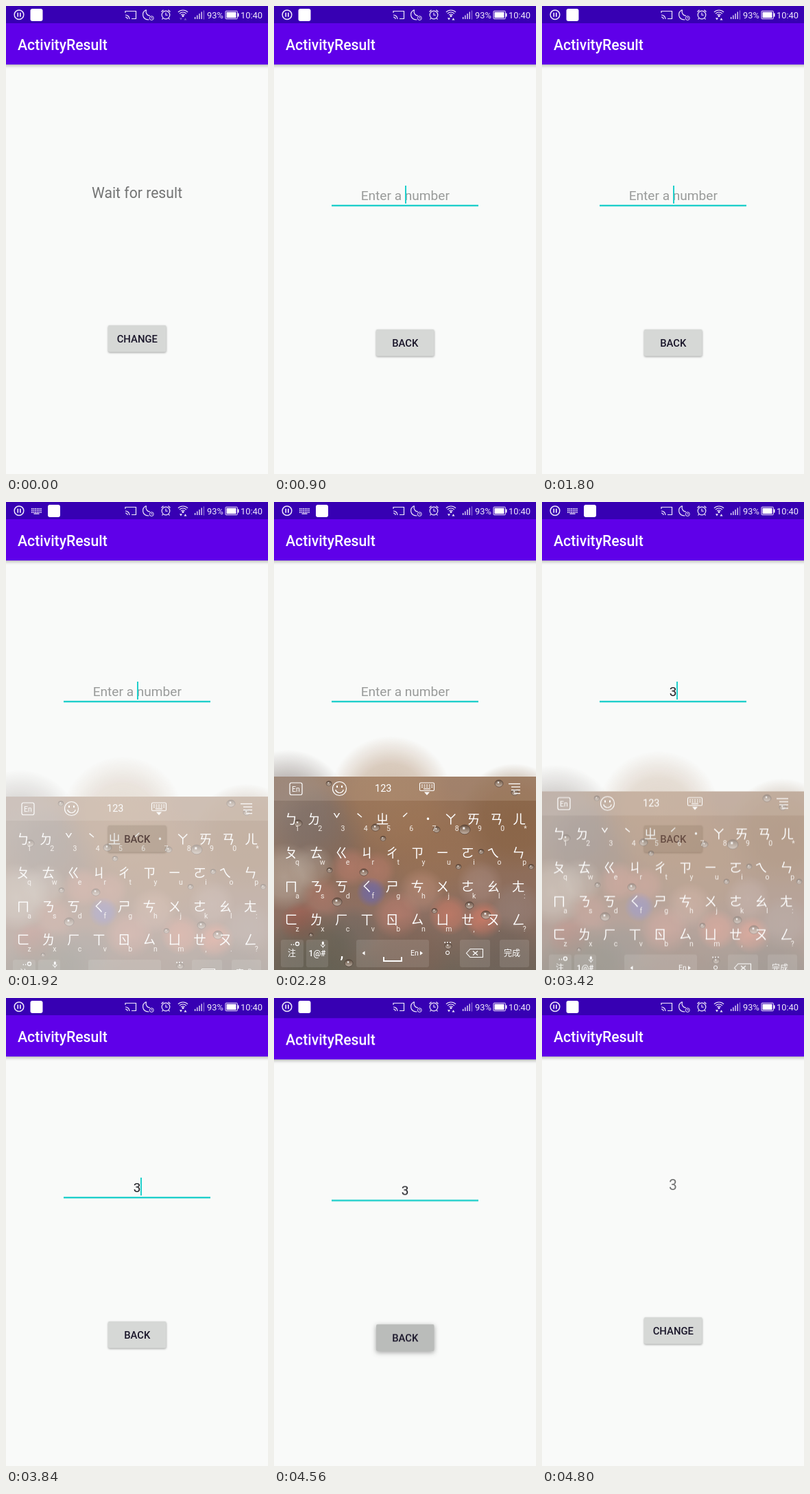
An HTML page with a canvas that plays this animation: 382x680 px, repeating every 6.42 s.

```html
<!DOCTYPE html>
<html lang="en">
<head>
<meta charset="utf-8">
<title>ActivityResult</title>
<style>
html, body { margin: 0; width: 100%; height: 100%; overflow: hidden; background: #f9faf9; }
canvas { display: block; width: 382px; height: 680px; }
</style>
</head>
<body>
<canvas id="stage"></canvas>
<script>
const W = 382, H = 680, LOOP = 6420, STEP = 60, KB_TOP = 399;
const UI = 'Roboto, sans-serif';
const CJK = '"Noto Sans CJK TC", "Noto Sans CJK", "Noto Sans CJK SC", "Noto Sans CJK JP", sans-serif';
const dpr = window.devicePixelRatio || 1;

function setup(cv) {
  cv.width = W * dpr;
  cv.height = H * dpr;
  const c = cv.getContext('2d');
  c.scale(dpr, dpr);
  return c;
}
const layer = () => setup(document.createElement('canvas'));

const clamp = v => Math.max(0, Math.min(1, v));
const ramp = (t, from, len) => clamp((t - from) / len);
const decel = p => 1 - (1 - p) * (1 - p);
const within = (t, a, b) => t >= a && t < b;

function text(c, s, x, y, font, color, align = 'center') {
  c.font = font;
  c.fillStyle = color;
  c.textAlign = align;
  c.fillText(s, x, y);
}
function box(c, x, y, w, h, r, color) {
  c.beginPath();
  c.roundRect(x, y, w, h, r);
  c.fillStyle = color;
  c.fill();
}
function frame(c, x, y, w, h, r, lw = 1) {
  c.lineWidth = lw;
  c.beginPath();
  c.roundRect(x, y, w, h, r);
  c.stroke();
}
function line(c, pts, lw = 1) {
  c.lineWidth = lw;
  c.beginPath();
  pts.forEach(([x, y], i) => i ? c.lineTo(x, y) : c.moveTo(x, y));
  c.stroke();
}
function arc(c, x, y, r, a = 0, b = Math.PI * 2, lw = 1) {
  c.lineWidth = lw;
  c.beginPath();
  c.arc(x, y, r, a, b);
  c.stroke();
}
function poly(c, pts) {
  c.beginPath();
  pts.forEach(([x, y]) => c.lineTo(x, y));
  c.fill();
}

// ---- status bar ----
function keyboardGlyph(c, x, y) {
  c.fillStyle = '#e6dcf7';
  for (let r = 0; r < 3; r++)
    for (let i = 0; i < 6; i++) c.fillRect(x + i * 2.6, y + r * 2.6, 1.7, 1.7);
  c.fillRect(x + 3.5, y + 7.4, 8, 1.4);
}
function statusIcons(c, typing, traffic) {
  const ink = '#f1ebfb', PI = Math.PI;
  c.strokeStyle = c.fillStyle = ink;
  arc(c, 19, 12.7, 6.8, 0, PI * 2, 1.5);
  c.fillRect(16.4, 9.7, 1.7, 6);
  c.fillRect(20, 9.7, 1.7, 6);
  if (typing) keyboardGlyph(c, 37, 9);
  box(c, typing ? 61 : 35.5, 4, 18, 18, 3, '#ffffff');

  c.strokeStyle = c.fillStyle = ink;
  line(c, [[174, 10], [174, 7.5], [189.5, 7.5], [189.5, 18.5], [183, 18.5]], 1.2);
  arc(c, 174, 19, 3, -PI / 2, 0, 1.2);
  arc(c, 174, 19, 6, -PI / 2, 0, 1.2);

  c.lineWidth = 1.2;
  c.beginPath();
  c.moveTo(204.5, 5.5);
  c.bezierCurveTo(197, 9, 198, 20, 208.5, 20);
  c.moveTo(204.5, 5.5);
  c.bezierCurveTo(203, 10, 206, 14.5, 210, 14);
  c.stroke();
  arc(c, 212.3, 17.6, 2.9);
  line(c, [[212.3, 16], [212.3, 17.8], [213.6, 17.8]], 0.9);

  arc(c, 233, 13, 5.8, 0, PI * 2, 1.2);
  line(c, [[233, 9.5], [233, 13.2], [235.8, 13.2]], 1.1);
  line(c, [[226.5, 8.5], [229.5, 5.8]], 1.3);
  line(c, [[239.5, 8.5], [236.5, 5.8]], 1.3);
  line(c, [[229, 17.5], [227.5, 19.5]], 1.2);
  line(c, [[237, 17.5], [238.5, 19.5]], 1.2);

  [10, 7, 4].forEach(r => arc(c, 258, 16, r, -PI * 0.75, -PI * 0.25, 1.2));
  c.beginPath();
  c.arc(258, 14.5, 1.5, 0, PI * 2);
  c.fill();
  c.fillStyle = traffic ? ink : 'rgba(241,235,251,.35)';
  poly(c, [[253, 17.2], [257, 17.2], [255, 20.4]]);
  poly(c, [[259.5, 20.4], [263.5, 20.4], [261.5, 17.2]]);

  c.fillStyle = ink;
  for (let i = 0; i < 4; i++) c.fillRect(275 + i * 3.2, 16 - i * 2.5, 1.3, 3 + i * 2.5);
  c.fillStyle = 'rgba(241,235,251,.55)';
  c.fillRect(288, 6.5, 1, 13);
  text(c, '93%', 305, 17.7, '12.85px ' + UI, ink);
  c.strokeStyle = ink;
  frame(c, 320, 7.3, 17.4, 11.4, 1);
  box(c, 321.5, 8.8, 14, 8.4, 0, '#ffffff');
  c.fillRect(338, 10.5, 1.5, 5);
  text(c, '10:40', 374, 17.7, '12.85px ' + UI, ink, 'right');
}

// ---- app screens ----
function appBase(c) {
  c.fillStyle = '#f9faf9';
  c.fillRect(0, 0, W, H);
  c.save();
  c.shadowColor = 'rgba(0,0,0,.32)';
  c.shadowBlur = 5 * dpr;
  c.shadowOffsetY = 1.5 * dpr;
  c.fillStyle = '#5f00e9';
  c.fillRect(-10, 25, W + 20, 60);
  c.restore();
  c.fillStyle = '#3700b3';
  c.fillRect(0, 0, W, 25);
  text(c, 'ActivityResult', 17, 63.5, '500 21.2px ' + UI, '#ffffff', 'left');
}
function button(c, label, y, press, fade) {
  c.save();
  c.shadowColor = 'rgba(0,0,0,.36)';
  c.shadowBlur = (3 + 4 * press * fade) * dpr;
  c.shadowOffsetY = (1 + press * fade) * dpr;
  box(c, 149, y, 84.5, 38.7, 2, '#d6d8d6');
  c.restore();
  if (press * fade > 0) {
    c.save();
    c.beginPath();
    c.roundRect(149, y, 84.5, 38.7, 2);
    c.clip();
    c.fillStyle = `rgba(0,0,0,${0.13 * fade})`;
    c.beginPath();
    c.arc(191, y + 19, 8 + 40 * press, 0, Math.PI * 2);
    c.fill();
    c.restore();
  }
  text(c, label, 191.3, y + 24.8, '500 14.85px ' + UI, '#191529');
}
function mainScreen(c, t) {
  appBase(c);
  text(c, t < 2000 ? 'Wait for result' : '3', 191, 279.3, '21.2px ' + UI, '#737474');
  button(c, 'CHANGE', 464, decel(ramp(t, 460, 200)), 1 - ramp(t, 680, 200));
}
function cursorOn(t) {
  return within(t, 840, 1380) || within(t, 1680, 2220) ||
         within(t, 2640, 3480) || within(t, 3840, 4380);
}
function inputScreen(c, t) {
  appBase(c);
  const typed = t >= 3000;
  if (typed) text(c, '3', 191, 281.8, '19.1px ' + UI, '#1e1e24');
  else text(c, 'Enter a number', 191.3, 281.8, '19.1px ' + UI, '#999b9a');
  c.fillStyle = '#1fcfcb';
  c.fillRect(84, 288.8, 214, 2.4);
  if (cursorOn(t)) c.fillRect(typed ? 196 : 191, 261, 2, 26);
  button(c, 'BACK', 470, decel(ramp(t, 4300, 180)), 1 - ramp(t, 4560, 160));
}

// ---- keyboard ----
function glow(c, x, y, r, rgb, a) {
  const g = c.createRadialGradient(x, y, 0, x, y, r);
  g.addColorStop(0, `rgba(${rgb},${a})`);
  g.addColorStop(0.55, `rgba(${rgb},${a * 0.75})`);
  g.addColorStop(1, `rgba(${rgb},0)`);
  c.fillStyle = g;
  c.fillRect(x - r, y - r, r * 2, r * 2);
}
function drop(c, x, y, r) {
  const g = c.createLinearGradient(x, y - r, x, y + r);
  g.addColorStop(0, 'rgba(80,62,50,.75)');
  g.addColorStop(0.5, 'rgba(150,132,118,.8)');
  g.addColorStop(1, 'rgba(216,204,194,.85)');
  c.beginPath();
  c.ellipse(x, y, r, r * 0.85, 0, 0, Math.PI * 2);
  c.fillStyle = g;
  c.fill();
  c.strokeStyle = 'rgba(45,33,28,.5)';
  c.lineWidth = 0.9;
  c.stroke();
  c.fillStyle = 'rgba(255,255,255,.85)';
  c.fillRect(x - r * 0.35, y - r * 0.45, r * 0.4, r * 0.4);
}
function backdrop(c) {
  const g = c.createLinearGradient(0, KB_TOP, 0, H);
  g.addColorStop(0, '#94725a');
  g.addColorStop(0.35, '#8f6c54');
  g.addColorStop(0.7, '#8d6f62');
  g.addColorStop(1, '#706458');
  c.fillStyle = g;
  c.fillRect(0, KB_TOP, W, H - KB_TOP);
  const gray = '139,128,123', tan = '166,126,92', pink = '196,128,112', pale = '190,178,166';
  [[20, 450, 90, gray, .7], [70, 480, 70, '120,106,100', .6], [170, 430, 90, tan, .5],
   [230, 500, 90, '157,116,84', .6], [350, 460, 80, '136,98,66', .7], [15, 545, 50, pale, .65],
   [55, 530, 34, pale, .4], [112, 530, 30, pink, .55], [150, 535, 28, pink, .5],
   [142, 567, 22, '108,104,176', .75], [70, 575, 30, pink, .4], [40, 612, 32, '176,84,70', .5],
   [180, 600, 36, pink, .6], [215, 565, 34, '200,150,132', .45], [255, 600, 30, '216,126,104', .6],
   [306, 608, 28, '222,126,104', .7], [300, 555, 34, '176,146,136', .5], [352, 590, 40, '150,130,122', .6],
   [115, 625, 40, '110,104,96', .6], [60, 660, 70, '92,94,80', .6], [200, 660, 60, '128,98,84', .5],
   [330, 660, 60, '110,98,90', .6]].forEach(a => glow(c, ...a));
  c.fillStyle = 'rgba(255,238,225,.13)';
  c.fillRect(0, KB_TOP, W, 35);
  [[80, 409, 4], [328, 409, 6], [351, 422, 5], [35, 467, 6], [148, 473, 6], [159, 489, 4],
   [237, 476, 5], [278, 476, 8], [302, 508, 4], [269, 530, 4], [131, 538, 6], [81, 535, 4],
   [375, 530, 4], [92, 581, 7], [234, 594, 4], [285, 586, 6], [309, 600, 7], [54, 629, 3],
   [254, 645, 5], [109, 670, 6]].forEach(d => drop(c, ...d));
}
function keyRow(c, keys, subs, y, gap) {
  [...keys].forEach((k, i) => {
    const x = 25 + i * gap;
    text(c, k, x, y + 7, '19px ' + CJK, '#ffffff');
    text(c, subs[i], x + 9, y + 17, '10.5px ' + UI, '#f3ece6');
  });
}
function toolRow(c) {
  c.strokeStyle = '#ffffff';
  frame(c, 23, 408, 18, 17.5, 2.5, 1.2);
  text(c, 'En', 32, 420.5, '10.5px ' + UI, '#ffffff');
  arc(c, 95.5, 416.5, 10, 0, Math.PI * 2, 1.2);
  arc(c, 95.5, 416.5, 6, 0.25, Math.PI - 0.25, 1.2);
  c.fillRect(91, 412, 2, 3);
  c.fillRect(98, 412, 2, 3);
  text(c, '123', 159.3, 421.3, '14.5px ' + UI, '#ffffff');
  frame(c, 212.5, 408, 21, 11.5, 1.5, 1.1);
  for (let i = 0; i < 5; i++) {
    c.fillRect(215 + i * 3.6, 410.6, 1.8, 1.5);
    c.fillRect(215 + i * 3.6, 413.4, 1.8, 1.5);
  }
  c.fillRect(218, 416.2, 10, 1.3);
  poly(c, [[219, 421.5], [227, 421.5], [223, 426]]);
  [[342, 409.5], [346, 414], [346, 418.5], [350, 423.5]].forEach(([x, y]) =>
    line(c, [[x, y], [359, y]], 1.3));
}
function bottomRow(c) {
  [[10, 33], [47, 32], [120, 106], [271, 44], [329, 43]].forEach(([x, w]) =>
    box(c, x, 636, w, 40, 3, 'rgba(255,255,255,.11)'));
  const white = '#ffffff';
  text(c, '注', 26, 660, '500 12px ' + CJK, white);
  text(c, '1@#', 63, 660, '500 12px ' + UI, white);
  text(c, ',', 99, 663, '500 22px ' + UI, white);
  text(c, '。', 253, 663, '500 20px ' + CJK, white);
  text(c, 'En', 205, 659, '10.5px ' + UI, white);
  text(c, '完成', 347, 660, '500 12px ' + CJK, white);
  text(c, '..', 27, 644, '500 12px ' + UI, white);
  text(c, '...', 253, 641, '500 14px ' + UI, white);
  poly(c, [[132.5, 652.5], [132.5, 658.5], [128.5, 655.5]]);
  poly(c, [[213, 652.5], [213, 658.5], [217, 655.5]]);
  c.strokeStyle = white;
  line(c, [[160, 661], [160, 667], [186, 667], [186, 661]], 2);
  arc(c, 34, 642, 2.5, 0, Math.PI * 2, 1.3);
  box(c, 69.8, 638.5, 3, 5, 1.5, white);
  arc(c, 71.3, 643, 2.8, 0, Math.PI);
  c.fillRect(70.8, 645.5, 1, 2.5);
  c.lineWidth = 1.1;
  c.beginPath();
  [[280.5, 655.5], [286, 649.5], [304.5, 649.5], [304.5, 661.5], [286, 661.5]].forEach(p => c.lineTo(...p));
  c.closePath();
  c.stroke();
  line(c, [[290, 652.5], [297, 658.5]], 1.2);
  line(c, [[297, 652.5], [290, 658.5]], 1.2);
}
function buildKeyboard() {
  const c = layer();
  backdrop(c);
  keyRow(c, 'ㄅㄉˇˋㄓˊ˙ㄚㄞㄢㄦ', '1234567890*', 461, 33.25);
  keyRow(c, 'ㄆㄊㄍㄐㄔㄗㄧㄛㄟㄣ', 'qwertyuiop', 509.5, 36.8);
  keyRow(c, 'ㄇㄋㄎㄑㄕㄘㄨㄜㄠㄤ', 'asdfghjkl:', 558.5, 36.8);
  keyRow(c, 'ㄈㄌㄏㄒㄖㄙㄩㄝㄡㄥ', 'zxcvbnm,.?', 606.5, 36.8);
  c.fillStyle = '#ffffff';
  toolRow(c);
  bottomRow(c);
  return c.canvas;
}

// ---- timeline ----
const ctx = setup(document.getElementById('stage'));
const sheet = layer();
const keyboard = buildKeyboard();

function overlay(image, dy, alpha) {
  ctx.globalAlpha = alpha;
  ctx.drawImage(image, 0, dy, W, H);
  ctx.globalAlpha = 1;
}
function draw(t) {
  const opening = ramp(t, 660, 200), closing = ramp(t, 4490, 250);
  const input = opening > 0 && closing < 1;
  if (opening < 1 || closing > 0) mainScreen(ctx, t);
  if (input) {
    inputScreen(sheet, t);
    const dy = 14 * (1 - opening) ** 3 + 54 * closing * closing;
    overlay(sheet.canvas, dy, decel(opening) * (1 - ramp(t, 4590, 150)));
  }
  const shown = decel(ramp(t, 1850, 250)) * (1 - ramp(t, 3290, 210) ** 2);
  if (shown > 0) {
    overlay(keyboard, 56 * (1 - shown), shown);
    if (within(t, 2640, 3000)) box(ctx, 76, 441, 31, 42, 3, 'rgba(255,255,255,.2)');
  }
  statusIcons(ctx, within(t, 1920, 3480), t >= 60);
}

const start = performance.now();
function tick() {
  const t = (performance.now() - start) % LOOP;
  draw(Math.floor(t / STEP) * STEP);
  requestAnimationFrame(tick);
}
tick();
</script>
</body>
</html>
```
